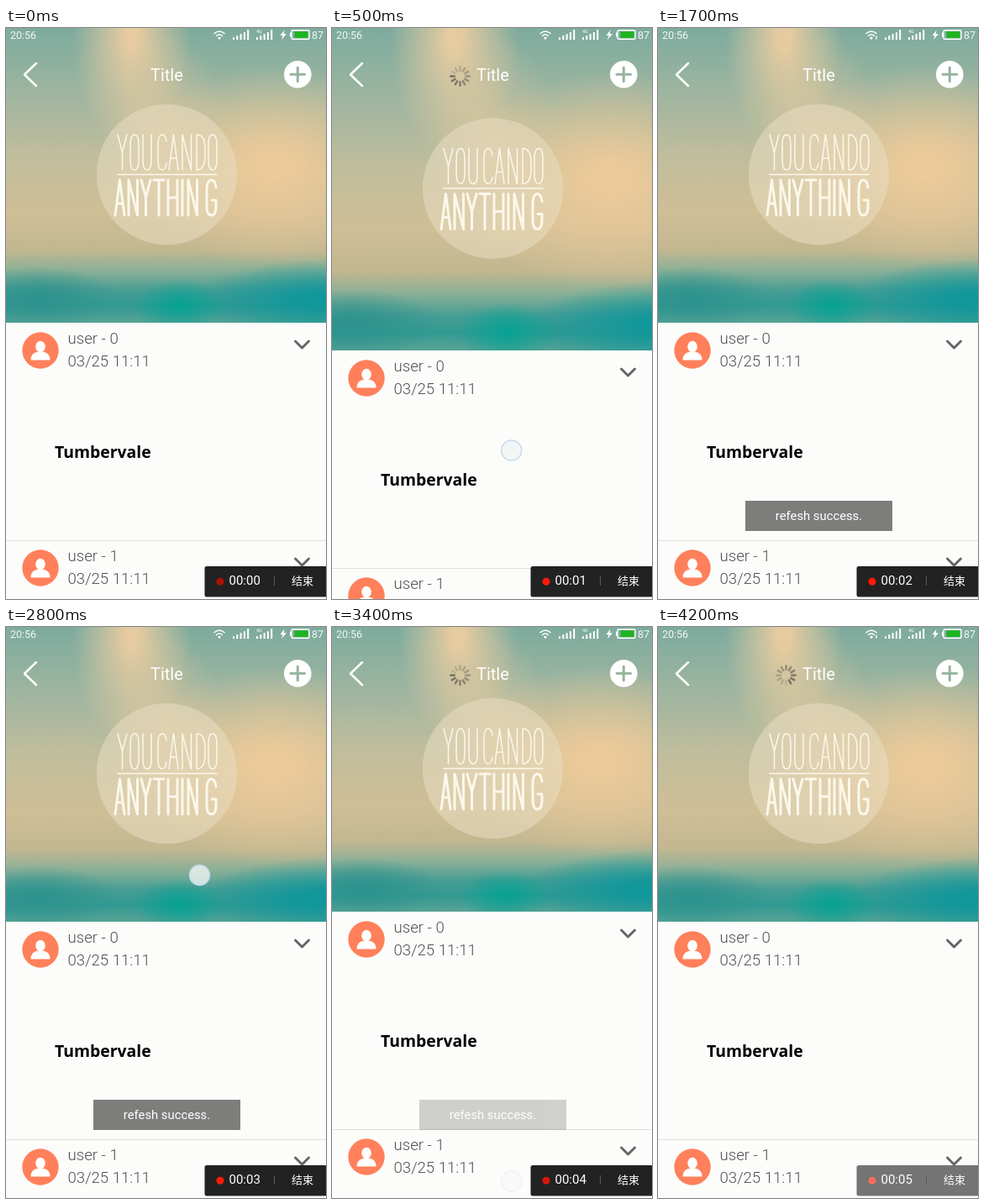
An HTML page that plays this animation: 381 px wide and 680 px high, repeating every 4300 ms.

```html
<!DOCTYPE html>
<html lang="en">
<head>
<meta charset="utf-8">
<title>Pull to refresh</title>
<style>
  html, body { margin: 0; width: 100%; height: 100%; overflow: hidden; background: #fcfcfa; }
  #stage { position: relative; width: 381px; height: 680px; overflow: hidden; }
  #hero {
    position: absolute; width: 381px; height: 352px; transform-origin: 50% 0;
    background:
      radial-gradient(ellipse 70px 135px at 150px 12px, #e6cba0 10%, #e6cba000),
      radial-gradient(ellipse 70px 120px at 192px 125px, #e0c89cb0, #e0c89c00),
      radial-gradient(ellipse 165px 118px at 318px 165px, #ecca99 12%, #ecca9900),
      radial-gradient(ellipse 55px 32px at 207px 331px, #06a293, #06a29300),
      radial-gradient(ellipse 150px 48px at 375px 324px, #12979a 15%, #12979a00),
      radial-gradient(ellipse 95px 38px at 38px 322px, #2d918d, #2d918d00),
      linear-gradient(#7dab9e, #9bb4a0 20%, #bfbd9d 42%, #cfbe96 62%, #c3b790 75%, #8cb097 82%, #469d94 89%, #329a92 94%, #5aa395);
  }
  svg { position: absolute; left: 0; top: 0; font-family: Roboto, sans-serif; }
  .line { fill: none; stroke-linecap: round; stroke-linejoin: round; }
  .row text { font-size: 18.6px; font-weight: 300; fill: #505050; }
</style>
</head>
<body>
<div id="stage">
  <div id="hero"></div>
  <svg width="381" height="680" viewBox="0 0 381 680">
    <defs>
      <g id="person">
        <circle cx="41" cy="384" r="21.7" fill="#ff805a"/>
        <ellipse cx="41" cy="379.5" rx="5.8" ry="6.8" fill="#fff"/>
        <path d="M29.5 395.5q0-8 7.500-9.700h8q7.500 1.700 7.500 9.700z" fill="#fff"/>
        <path class="line" d="M344.500 373l8 8 8-8" stroke="#666" stroke-width="3"/>
      </g>
    </defs>

    <g id="badge">
      <circle cx="191.500" cy="174.500" r="83.700" fill="#eadfc4" fill-opacity=".52"/>
      <g id="lettering" class="line" stroke="#fbf8ea" role="img" aria-label="You can do anything">
        <path d="M133 174.500H251" stroke-width="1.500"/>
      </g>
    </g>

    <g id="list">
      <rect y="351" width="381" height="400" fill="#fcfcfa"/>
      <g class="row">
        <use href="#person"/>
        <text x="73.500" y="376">user - 0</text>
        <text x="73.500" y="403">03/25 11:11</text>
      </g>
      <text x="58" y="512" font-family="Open Sans, sans-serif" font-size="19.400" font-weight="700" fill="#000">Tumbervale</text>
      <path d="M0 610.500H381" stroke="#dde0dc"/>
      <g class="row" transform="translate(0 259)">
        <use href="#person"/>
        <text x="73.500" y="376">user - 1</text>
        <text x="73.500" y="403">03/25 11:11</text>
      </g>
    </g>

    <g fill="#fff" font-size="12.500">
      <text x="5" y="13" fill-opacity=".9">20:56</text>
      <text x="364" y="13" fill-opacity=".9">87</text>
      <g class="line" stroke="#fff" stroke-width="1.500">
        <path d="M248 6.500q6-5 12 0M250.500 9.300q3.500-3 7 0"/>
        <path d="M253 11.500h2l-1 1.500z"/>
        <path id="traffic" d="M260 10v3" stroke-width="1.300"/>
      </g>
      <path d="M271 14v-3m4.300 3v-5m4.300 5v-7m4.300 7v-9m4.300 9v-12M299 14v-3m4.300 3v-5m4.300 5v-7m4.300 7v-9m4.300 9v-12" stroke="#fff" stroke-width="2"/>
      <text x="298" y="6" font-size="5.500">4G</text>
      <path d="M331.500 2.500l-5 6.500h3l-1.500 5 6-7h-3.200z"/>
      <rect x="340" y="2.700" width="21" height="10.600" rx="1.500" fill="none" stroke="#fff" stroke-width="1.400"/>
      <path d="M338 5.500h1.500v5H338z"/>
      <rect x="343.500" y="4.200" width="16" height="7.600" fill="#1cb420"/>
    </g>

    <path class="line" d="M36 42L22 55.500 36 69" stroke="#fff" stroke-width="2.500"/>
    <text x="172" y="63" font-size="20" fill="#fff">Title</text>
    <circle cx="347.300" cy="55.200" r="16.300" fill="#fff"/>
    <path class="line" d="M339 55.200h16.600M347.300 47v16.500" stroke="#97b49c" stroke-width="3"/>
    <g id="spinner" class="line" stroke="#625f58" stroke-width="2.500"></g>

    <g id="toast">
      <rect x="104" y="563" width="175" height="36" fill="#000" fill-opacity=".5"/>
      <text x="191.500" y="586" font-size="14.800" fill="#fff" text-anchor="middle">refesh success.</text>
    </g>

    <g id="touch">
      <circle r="12" fill="#eef5f2" fill-opacity=".8" stroke="#c3d5ec" stroke-width="1.500"/>
    </g>

    <g>
      <rect id="panel" x="236.500" y="641" width="146" height="36.500" rx="2.500" fill="#222"/>
      <circle id="dot" cx="255" cy="659.300" r="4.500"/>
      <text id="clock" x="265.500" y="663.300" font-size="15" fill="#fff"></text>
      <path d="M319.500 653v11" stroke="#5c5c54"/>
      <text x="340" y="662.500" font-family="Noto Sans CJK SC, Noto Sans CJK, sans-serif" font-size="13" fill="#fff">结束</text>
    </g>
  </svg>
</div>
<script>
const LOOP = 4300, TICK = 100;
const $ = id => document.getElementById(id);

function addPath(parent, attrs) {
  const path = document.createElementNS('http://www.w3.org/2000/svg', 'path');
  for (const name in attrs) path.setAttribute(name, attrs[name]);
  parent.append(path);
  return path;
}

// Tall hand-drawn capitals, each about 11 x 42
const glyphs = {
  A: 'M0 42L5.500 0 11 42M2 28H9',
  C: 'M10 8Q9 0 5 0 0 0 0 12V31Q0 42 5 42 9 42 10 34',
  D: 'M0 0V42Q10 42 10 24V17Q10 0 0 0',
  G: 'M11 9Q10 0 5.500 0 0 0 0 13V30Q0 42 5.500 42 11 42 11 31V24H6',
  H: 'M0 0V42M11 0V42M0 21H11',
  I: 'M0 0V42',
  N: 'M0 42V0L10.500 42V0',
  O: 'M5 0Q0 0 0 13V30Q0 42 5 42 10 42 10 30V13Q10 0 5 0',
  T: 'M0 0H12M6 0V42',
  U: 'M0 0V31Q0 42 5 42 10 42 10 31V0',
  Y: 'M0 0L5.500 21 11 0M5.500 21V42'
};
function letter(word, xs, y, weight) {
  [...word].forEach((c, i) => addPath($('lettering'), {
    d: glyphs[c], transform: `translate(${xs[i]} ${y})`, 'stroke-width': weight
  }));
}
letter('YOUCANDO', [133, 148, 163, 181, 194, 210, 227, 241], 127, 1.5);
letter('ANYTHING', [130, 146, 161, 176, 193, 210, 217, 239], 181, 3);

const spokes = Array.from({ length: 12 }, (_, i) => addPath($('spinner'), {
  d: 'M6.800 0H11.200', transform: `translate(152.500 57.500) rotate(${i * 30})`
}));

// Linear track through alternating time, value pairs
function track(t, ...keys) {
  if (t <= keys[0]) return keys[1];
  for (let i = 2; i < keys.length; i += 2) {
    if (t <= keys[i]) {
      const k = (t - keys[i - 2]) / (keys[i] - keys[i - 2]);
      return keys[i - 1] + (keys[i + 1] - keys[i - 1]) * k;
    }
  }
  return keys[keys.length - 1];
}
const between = (t, from, to) => t >= from && t < to;

function draw(t) {
  const second = t >= 2700;

  const pull = second
    ? track(t, 2800, 0, 2900, 35, 3000, 90, 3100, 65, 3200, 6, 3300, -16, 3400, -12, 3500, -3, 3600, 0)
    : track(t, 100, 0, 200, 24, 300, 66, 400, 78, 500, 33, 600, -4, 700, -2, 800, 0);
  const scale = (351 + pull) / 351;
  $('hero').style.transform = `scale(${Math.max(1, scale)}, ${scale})`;
  $('badge').setAttribute('transform', `translate(0 ${pull / 2})`);
  $('list').setAttribute('transform', `translate(0 ${pull})`);

  const x = second ? track(t, 2800, 230.5, 3100, 214) : track(t, 100, 226, 400, 213.7);
  const y = second
    ? track(t, 2800, 295.5, 2900, 390, 3000, 550, 3100, 660)
    : track(t, 100, 300, 200, 350, 300, 440, 400, 503);
  $('touch').setAttribute('transform', `translate(${x} ${y})`);
  $('touch').setAttribute('opacity', second
    ? track(t, 2700, .5, 2800, 1, 3100, 1, 3400, .25, 3500, 0)
    : track(t, 0, 0, 100, 1, 400, 1, 500, .9, 600, .3, 700, 0));

  const spinning = between(t, 300, 1500) || t >= 3100;
  $('spinner').setAttribute('visibility', spinning ? 'visible' : 'hidden');
  const head = 6 + (t - (second ? 3400 : 500)) / TICK;
  spokes.forEach((spoke, i) => {
    const age = (((head - i) % 12) + 12) % 12;
    spoke.setAttribute('opacity', .85 - age * .06);
  });

  $('toast').setAttribute('opacity', track(t, 1400, 0, 1600, 1, 3200, 1, 3300, .7, 3400, .35, 3500, 0));
  $('traffic').setAttribute('visibility',
    between(t, 600, 2300) || t >= 3900 ? 'visible' : 'hidden');

  const seconds = Math.floor((t + 800) / 1000);
  $('clock').textContent = '00:0' + seconds;
  const ending = t >= 4200;
  $('panel').setAttribute('fill-opacity', ending ? .62 : 1);
  const glow = track(t % 1000, 0, .68, 200, .6, 400, .84, 500, 1, 900, 1, 1000, .68);
  $('dot').setAttribute('fill', ending ? '#f96c5e' : `rgb(${255 * glow}, ${26 * glow}, ${8 * glow})`);
}

const start = performance.now();
function frame() {
  const t = (performance.now() - start) % LOOP;
  draw(Math.floor(t / TICK) * TICK);
  requestAnimationFrame(frame);
}
frame();
</script>
</body>
</html>
```
